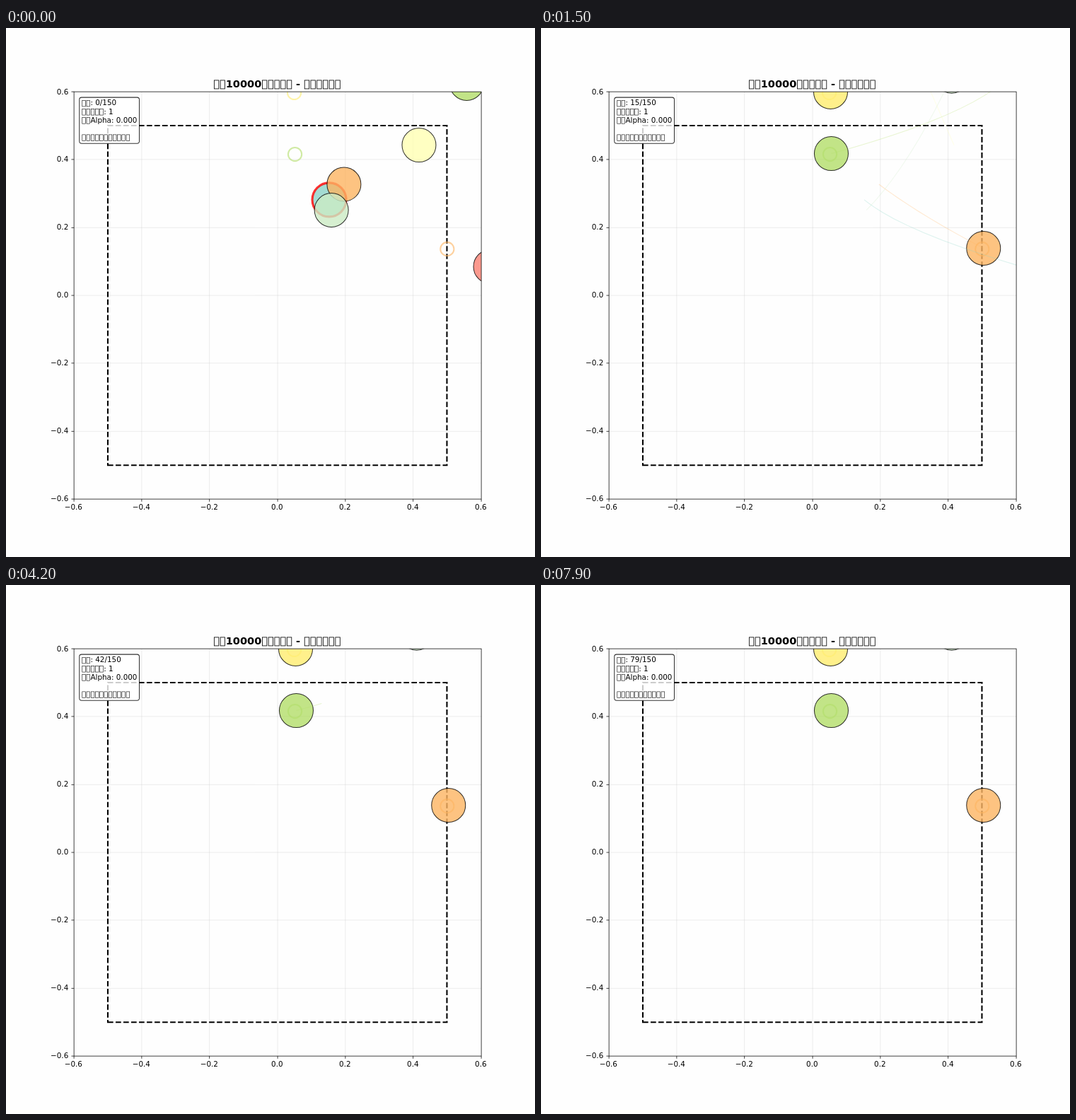
Recreate the animation shown at these times as an HTML page with a canvas. Size 748x748 px, loop 8 s.

```html
<!DOCTYPE html>
<html lang="en">
<head>
<meta charset="utf-8">
<title>Particles</title>
<style>
html, body { margin: 0; width: 100%; height: 100%; overflow: hidden; background: #fefefe; }
canvas { display: block; width: 748px; height: 748px; }
</style>
</head>
<body>
<canvas id="stage" width="748" height="748"></canvas>
<script>
// The plot is laid out on a 1000 unit figure at 100 dpi and scaled to the stage.
const c = document.getElementById('stage').getContext('2d');
const FIGURE = 1000, PT = 100 / 72;
const STEP = 100, STEPS = 80, TRAIL = 30;
const LIMIT = 0.6, UNIT = 770 / 1.2;

const X = x => 512.5 + x * UNIT;
const Y = y => 505 - y * UNIT;
const snap = v => Math.floor(v + 0.5 + 1e-6) + 0.5;
const LEFT = snap(X(-LIMIT)), RIGHT = snap(X(LIMIT));
const TOP = snap(Y(LIMIT)), BOTTOM = snap(Y(-LIMIT));

// Each ball eases from start past bend to end within a number of steps
const balls = [
  { color: '#8dd3c7', edge: '#f00', width: 3, steps: 15, start: [0.1535, 0.281], bend: [0.281, 0.176], end: [0.709, 0.058] },
  { color: '#ffffb3', steps: 15, start: [0.418, 0.442], bend: [0.34, 0.621], end: [0.262, 0.8] },
  { color: '#fb8072', steps: 15, start: [0.6285, 0.084], bend: [0.707, 0.06], end: [0.785, 0.037] },
  { color: '#fdb462', steps: 13, start: [0.197, 0.3265], bend: [0.314, 0.238], end: [0.505, 0.138], goal: true },
  { color: '#b3de69', steps: 15, start: [0.5585, 0.6235], bend: [0.428, 0.518], end: [0.0565, 0.417], goal: true },
  { color: '#ccebc5', steps: 14, start: [0.16, 0.2505], bend: [0.288, 0.381], end: [0.411, 0.645] },
  { color: '#ffed6f', steps: 15, start: [0.285, 0.954], bend: [0.17, 0.776], end: [0.0545, 0.5985], goal: true }
];

function place({ start, bend, end, steps }, step) {
  const t = Math.min(step / steps, 1), u = t * t * (3 - 2 * t), v = 1 - u;
  const [x, y] = start.map((p, d) => v * v * p + 2 * u * v * bend[d] + u * u * end[d]);
  return [X(x), Y(y)];
}

function pen(color, width, alpha = 1) {
  c.strokeStyle = color;
  c.lineWidth = width;
  c.globalAlpha = alpha;
}

function line(x1, y1, x2, y2) {
  c.beginPath();
  c.moveTo(x1, y1);
  c.lineTo(x2, y2);
  c.stroke();
}

function circle(x, y, radius) {
  c.beginPath();
  c.arc(x, y, radius * UNIT, 0, 2 * Math.PI);
}

// Text in which each ▯ is drawn as an empty glyph box; align: 0 left, 0.5 centre, 1 right
function label(text, x, y, align = 0, size = 10 * PT, weight = '') {
  c.font = `${weight} ${size}px "DejaVu Sans", sans-serif`;
  c.fillStyle = '#000';
  pen('#000', 0.056 * size);
  const parts = text.match(/▯|[^▯]+/g) || [];
  const widthOf = part => part === '▯' ? 0.6 * size : c.measureText(part).width;
  x -= align * parts.reduce((sum, part) => sum + widthOf(part), 0);
  for (const part of parts) {
    if (part === '▯') c.strokeRect(x + 0.078 * size, y - 0.677 * size, 0.444 * size, 0.826 * size);
    else c.fillText(part, x, y);
    x += widthOf(part);
  }
}

function drawGrid() {
  pen('#b0b0b0', 1, 0.3);
  for (let k = -2; k <= 2; k++) {
    const x = snap(X(k / 5)), y = snap(Y(k / 5));
    line(x, TOP, x, BOTTOM);
    line(LEFT, y, RIGHT, y);
  }
}

function drawBorder() {
  const [x1, x2] = [-0.5, 0.5].map(v => snap(X(v)));
  const [y1, y2] = [-0.5, 0.5].map(v => snap(Y(v)));
  pen('#000', 2 * PT);
  c.setLineDash([7.4 * PT, 3.2 * PT]);
  c.beginPath();
  c.moveTo(x1, y1);
  c.lineTo(x2, y1);
  c.lineTo(x2, y2);
  c.lineTo(x1, y2);
  c.closePath();
  c.stroke();
  c.setLineDash([]);
}

function drawBalls(step) {
  for (const ball of balls) {
    pen(ball.edge || '#000', (ball.width || 1) * PT, 0.8);
    c.fillStyle = ball.color;
    circle(...place(ball, step), 0.05);
    c.fill();
    c.stroke();
  }
  for (const { color, end, goal } of balls) {
    if (!goal) continue;
    pen(color, 2 * PT, 0.6);
    circle(X(end[0] - 0.004), Y(end[1] - 0.002), 0.02);
    c.stroke();
  }
  for (const ball of balls) {
    pen(ball.color, PT, 0.3);
    c.beginPath();
    for (let s = Math.max(0, step - TRAIL); s <= step; s++) c.lineTo(...place(ball, s));
    c.stroke();
  }
}

function drawAxes() {
  const tick = 3.5 * PT;
  pen('#000', 1);
  c.strokeRect(LEFT, TOP, RIGHT - LEFT, BOTTOM - TOP);
  for (let k = -3; k <= 3; k++) {
    const x = snap(X(k / 5)), y = snap(Y(k / 5));
    const text = (k / 5).toFixed(1).replace('-', '−');
    pen('#000', 1);
    line(x, BOTTOM, x, BOTTOM + tick);
    line(LEFT, y, LEFT - tick, y);
    label(text, X(k / 5), 911, 0.5);
    label(text, 118, Y(k / 5) + 5, 1);
  }
  label('▯▯10000▯▯▯▯▯ - ▯▯▯▯▯▯', 512.5, 112, 0.5, 14 * PT, 'bold');
}

function drawInfo(step) {
  pen('#000', PT, 0.8);
  c.fillStyle = '#fff';
  c.beginPath();
  c.roundRect(138.7, 131.2, 113.3, 87, 4.2);
  c.fill();
  c.stroke();
  [`▯▯: ${step}/150`, '▯▯▯▯▯: 1', '▯▯Alpha: 0.000', '', '▯▯▯▯▯▯▯▯▯▯▯']
    .forEach((text, i) => label(text, 143, 146.3 + i * 16.2));
}

function draw(time) {
  const step = Math.floor(time / STEP) % STEPS;
  c.setTransform(748 / FIGURE, 0, 0, 748 / FIGURE, 0, 0);
  c.globalAlpha = 1;
  c.fillStyle = '#fefefe';
  c.fillRect(0, 0, FIGURE, FIGURE);
  c.save();
  c.beginPath();
  c.rect(LEFT, TOP, RIGHT - LEFT, BOTTOM - TOP);
  c.clip();
  drawGrid();
  drawBorder();
  drawBalls(step);
  c.restore();
  drawAxes();
  drawInfo(step);
}

const begin = performance.now();
function loop() {
  draw(performance.now() - begin);
  requestAnimationFrame(loop);
}
loop();
</script>
</body>
</html>
```
